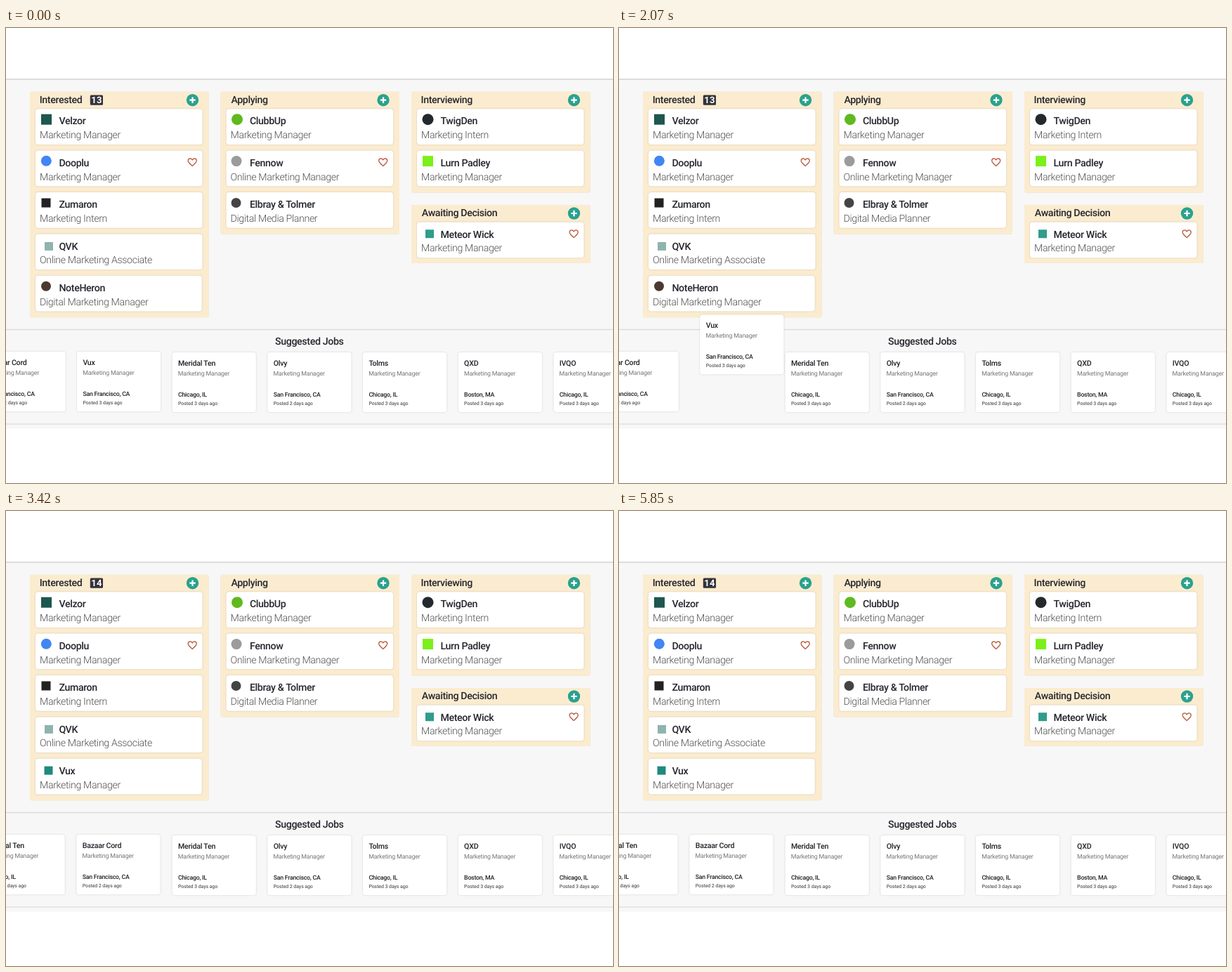
An HTML page for the animation above (5.88 s loop, 864 px wide and 648 px high).

```html
<!DOCTYPE html>
<html lang="en">
<head>
<meta charset="utf-8">
<title>Job board</title>
<style>
html, body { margin: 0; width: 100%; height: 100%; overflow: hidden; background: #fff; }
svg { display: block; width: 864px; height: 648px; font-family: Roboto, Arial, sans-serif; text-rendering: geometricPrecision; }
.column { fill: #fbecd0; filter: drop-shadow(0 .7px .7px rgba(0, 0, 0, .12)); }
.card { fill: #fff; filter: drop-shadow(0 .7px .8px rgba(0, 0, 0, .17)); }
.head, .name { font-size: 14.2px; font-weight: 500; fill: #26272f; letter-spacing: -.37px; }
.role { font-size: 14.2px; font-weight: 300; fill: #505050; letter-spacing: -.36px; }
.badge { font-size: 13px; font-weight: 700; fill: #fff; letter-spacing: .3px; }
.job { font-size: 10.6px; font-weight: 500; fill: #222329; letter-spacing: -.24px; }
.jobrole { font-size: 8.8px; font-weight: 400; fill: #777; letter-spacing: -.17px; }
.place { font-size: 8.75px; font-weight: 500; fill: #222; letter-spacing: -.24px; }
.posted { font-size: 7px; font-weight: 500; fill: #5f5f5f; letter-spacing: -.1px; }
.heart { fill: none; stroke: #b9593b; stroke-width: 1.3; stroke-linejoin: round; }
</style>
</head>
<body>
<svg id="stage" viewBox="0 0 864 648"></svg>
<script>
const LOOP = 5880;
const stage = document.getElementById('stage');

function add(parent, tag, attrs, text) {
  const el = document.createElementNS('http://www.w3.org/2000/svg', tag);
  for (const key in attrs) el.setAttribute(key, attrs[key]);
  if (text) el.textContent = text;
  parent.appendChild(el);
  return el;
}
const group = (parent = stage) => add(parent, 'g', {});
const rect = (p, x, y, width, height, attrs) => add(p, 'rect', { x, y, width, height, ...attrs });
const label = (p, x, y, cls, text) => add(p, 'text', { x, y, class: cls }, text);

function plus(x, y) {
  add(stage, 'circle', { cx: x, cy: y, r: 8.7, fill: '#2aa18f' });
  add(stage, 'path', { d: `M${x - 4.2} ${y}h8.4M${x} ${y - 4.2}v8.4`, stroke: '#fff', 'stroke-width': 2.2 });
}

function heart(x, y) {
  add(stage, 'path', {
    class: 'heart', transform: `translate(${x} ${y})`,
    d: 'M0 5.4C-3.5 2.4-6 .4-6-2C-6-5.6-1.8-6.3 0-3.2C1.8-6.3 6-5.6 6-2C6 .4 3.5 2.4 0 5.4Z'
  });
}

// One plain shape per company: circle or square
function mark(p, x, y, size, color, round) {
  if (round) add(p, 'circle', { cx: x, cy: y, r: size / 2, fill: color });
  else rect(p, x - size / 2, y - size / 2, size, size, { fill: color });
}

function row(parent, x, y, width, [name, role, color, size, round, dx = 15.5, dy = 15]) {
  const g = group(parent);
  rect(g, x, y, width, 50.7, { rx: 4, class: 'card' });
  mark(g, x + dx, y + dy, size, color, round);
  label(g, x + 33.4, y + 22.2, 'name', name);
  label(g, x + 6, y + 41.9, 'role', role);
  return g;
}

function column(x, y, height, title, titleX, rows, hearts = []) {
  rect(stage, x, y, 254.5, height, { rx: 2, class: 'column' });
  label(stage, titleX, y + 16.4, 'head', title);
  plus(x + 231.5, y + 12);
  return rows.map((data, i) => {
    const top = y + 24.5 + i * 59.4;
    const g = row(stage, x + 8, top, i === 4 ? 236.7 : 237.5, data);
    if (hearts.includes(i)) heart(x + 231.2, top + 16.5);
    return g;
  });
}

function jobCard(x, y, [name, place, days]) {
  const g = group();
  rect(g, x, y, 119.2, 85, { rx: 3.5, class: 'card' });
  label(g, x + 8.4, y + 18.5, 'job', name);
  label(g, x + 8.2, y + 32.6, 'jobrole', 'Marketing Manager');
  label(g, x + 8.4, y + 63.1, 'place', place);
  label(g, x + 8.4, y + 75, 'posted', `Posted ${days} days ago`);
  return g;
}

// Page
rect(stage, 0, 73, 864, 497.5, { fill: '#f7f7f7' });
rect(stage, 0, 72.2, 864, 1.5, { fill: '#d3d3d6' });
rect(stage, 0, 428.8, 864, 1.4, { fill: '#dadadb' });
rect(stage, 0, 563.4, 864, 1.3, { fill: '#dedede' });

// Board
const manager = 'Marketing Manager', intern = 'Marketing Intern';
const interested = column(34, 90.7, 321.6, 'Interested', 47.7, [
  ['Velzor', manager, '#1d574f', 15, false],
  ['Dooplu', manager, '#4285f4', 15, true, 15.3, 14.6],
  ['Zumaron', intern, '#222222', 13, false, 15],
  ['QVK', 'Online Marketing Associate', '#8fb3ae', 12, false, 19, 17.5],
  ['NoteHeron', 'Digital Marketing Manager', '#4b3a31', 14, true, 15]
], [1]);
const leaving = interested[4];
const landed = row(stage, 42, 352.8, 236.7, ['Vux', manager, '#1f8a80', 12, false, 18.5, 16.8]);

rect(stage, 119.8, 95.6, 18.2, 14.2, { rx: 1.5, fill: '#32333b' });
const count = label(stage, 129.1, 107.3, 'badge', '13');
count.setAttribute('text-anchor', 'middle');

column(305.5, 90.7, 202.7, 'Applying', 320.5, [
  ['ClubbUp', manager, '#5fb91f', 16, true],
  ['Fennow', 'Online Marketing Manager', '#9b9b9b', 15, true, 14.5],
  ['Elbray & Tolmer', 'Digital Media Planner', '#444444', 14, true, 14]
], [1]);
column(577, 90.7, 143.7, 'Interviewing', 590.6, [
  ['TwigDen', intern, '#24292e', 16, true],
  ['Lurn Padley', manager, '#7cf01a', 15, false]
]);
column(577, 252, 83, 'Awaiting Decision', 591.8, [
  ['Meteor Wick', manager, '#2f9c8c', 12, false, 18, 16.7]
], [0]);

// Suggested jobs
label(stage, 431.8, 450.7, 'head', 'Suggested Jobs').setAttribute('text-anchor', 'middle');
const SF = 'San Francisco, CA', CHI = 'Chicago, IL';
[
  ['Meridal Ten', CHI, 3],
  ['Olvy', SF, 2],
  ['Tolms', CHI, 3],
  ['QXD', 'Boston, MA', 3],
  ['IVQO', CHI, 3]
].forEach((job, i) => jobCard(236.6 + i * 135.7, 462, job));
const sliding = [
  jobCard(-34.4, 461, ['Bazaar Cord', SF, 2]),
  jobCard(-170.2, 461, ['Meridal Ten', CHI, 3])
];
const dragged = jobCard(101, 461, ['Vux', SF, 3]);

// Motion
const part = (t, start, length) => Math.min(1, Math.max(0, (t - start) / length));
const ease = u => u < .5 ? 2 * u * u : 1 - 2 * (1 - u) * (1 - u);
const move = (el, x, y) => el.setAttribute('transform', `translate(${x.toFixed(2)} ${y.toFixed(2)})`);
const fade = (el, a) => el.setAttribute('opacity', a);

function draw(t) {
  const drag = ease(part(t, 1500, 1188));
  move(dragged, 31 * drag, -114 * drag);
  fade(dragged, 1 - part(t, 2780, 180));
  fade(leaving, 1 - part(t, 2400, 160));
  fade(landed, part(t, 2860, 180));

  const slide = ease(part(t, 2560, 600));
  sliding.forEach(card => move(card, 134.7 * slide, 0));
  count.textContent = t < 3000 ? '13' : '14';
}

const begin = performance.now();
function tick() {
  draw((performance.now() - begin) % LOOP);
  requestAnimationFrame(tick);
}
draw(0);
requestAnimationFrame(tick);
</script>
</body>
</html>
```
